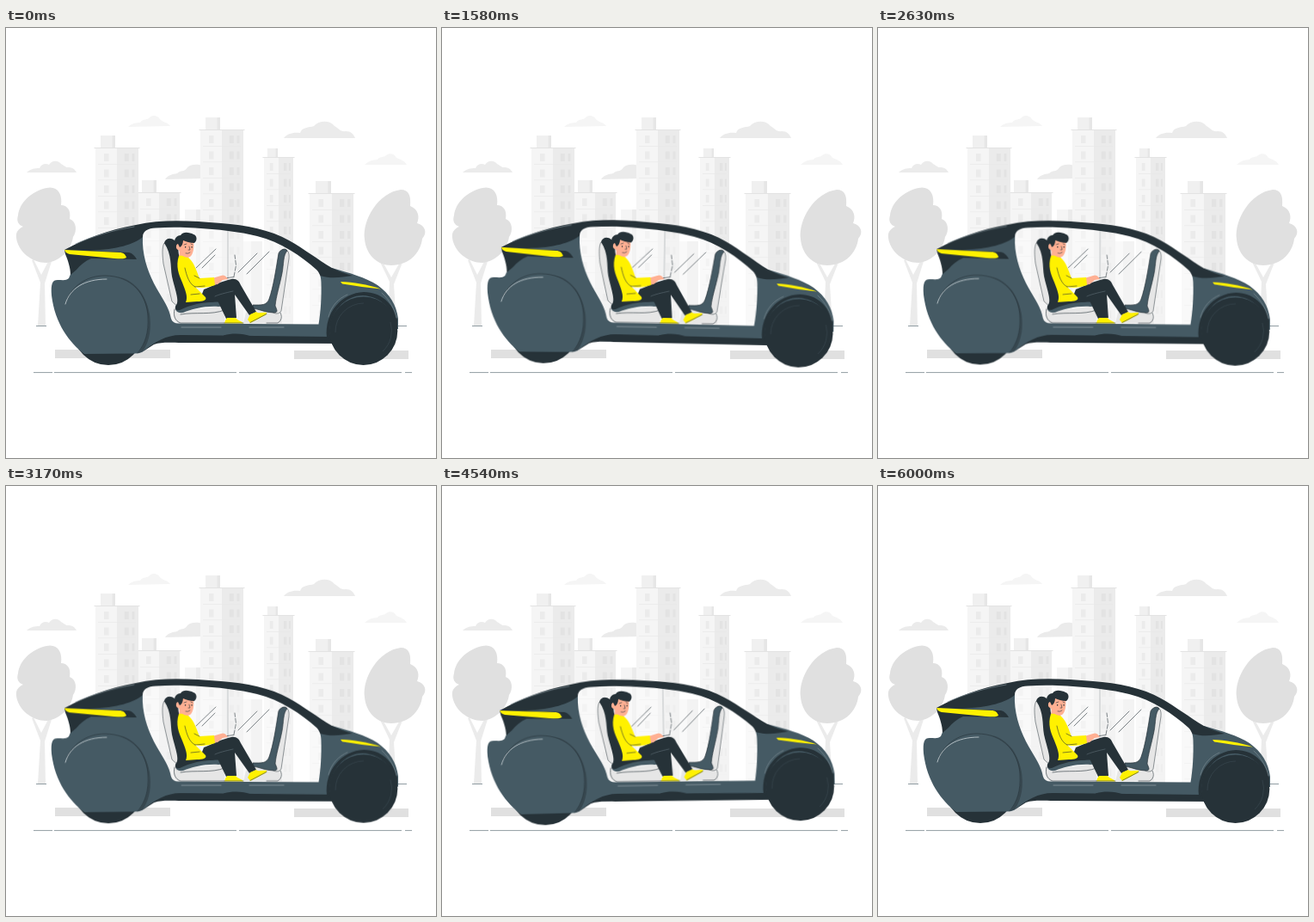
An HTML page that plays this animation: 500 by 500 pixels, repeating every 6.04 s.

```html
<!DOCTYPE html>
<html lang="en">
<head>
<meta charset="utf-8">
<title>Self-driving car</title>
<style>
  html, body { margin: 0; width: 100%; height: 100%; overflow: hidden; background: #fff; }
  svg { display: block; width: 100%; height: 100%; }
  .blue { fill: #455a64; }
  .dark { fill: #263238; }
  .yellow { fill: #fff100; }
  .skin { fill: #ffb093; }
  .pale { fill: #f5f5f5; }
  .soft { fill: #ebebeb; }
  .grey { fill: #e0e0e0; }
  .line { fill: none; stroke: #263238; stroke-width: .6; stroke-linecap: round; stroke-linejoin: round; }
  .shine { fill: none; stroke: #dfe5e8; stroke-width: .7; stroke-linecap: round; }
  .car { transform-origin: 254px 309px; animation: sway 6040ms linear infinite; }
  /* six seconds of sway, then a 40 ms rest */
  @keyframes sway {
    0%, 99.338%, 100% { transform: rotate(0deg); }
    24.834% { transform: rotate(1deg); }
    74.503% { transform: rotate(-1deg); }
  }
</style>
</head>
<body>
<svg viewBox="0 0 500 500">
  <defs>
    <path id="glass" d="M159 243C159 236 165 233 174 232.500C190 231.500 206 231.800 220 232.500C246 234 272 237 292 242C320 249 343 265 361 281C365 285 366.500 290 366.500 296C367 313 366 330 363.500 344.500L200 343.500C193 343 192 339 191 334C188 322 180 312 172 297C164 281 158 262 159 243Z"/>
    <mask id="shell" maskUnits="userSpaceOnUse" x="40" y="210" width="430" height="200">
      <path fill="#fff" d="M40 210H470V410H40Z"/>
      <use href="#glass" fill="#000"/>
    </mask>
    <clipPath id="cabin"><use href="#glass"/></clipPath>
  </defs>

  <g id="clouds">
    <path class="soft" d="M24 168C28 164 33 163 39 163C41 158 46 157 50 159C53 154 60 153 64 158C68 160 69 162 72 162C77 162 80 164 82 168Z"/>
    <path class="pale" d="M142 115C146 111 151 110 156 110C158 106 163 107 166 105C169 101 176 101 179 106C182 110 188 109 191 114Z"/>
    <path class="soft" d="M323 128C327 123 333 121 342 122C344 115 352 116 358 114C364 107 377 107 382 114C387 117 389 121 395 120C401 120 404 123 406 128Z"/>
    <path class="pale" d="M417 159C421 155 426 153 432 153C434 149 439 151 442 148C446 145 452 146 454 151C459 153 463 154 466 159Z"/>
    <path class="soft" d="M185 176C188 171 194 170 199 169C203 165 208 168 211 162C215 158 223 158 228 160V175Z"/>
  </g>

  <g id="city"></g>

  <g id="trees">
    <path class="soft" d="M37 346L40 296L30 270L32 269L41 287L53 264L55 265L45 297L46 346Z"/>
    <path class="grey" d="M14 218C16 202 30 190 47 186C59 183 66 192 64 206C71 206 76 212 74 222C82 225 83 236 78 243C76 257 64 271 47 273C30 273 14 260 12 244C11 237 15 233 20 231C14 229 12 224 14 218Z"/>
    <path class="soft" d="M444 346L446 295L434 270L437 270L448 290L460 269L462 270L451 298L454 346Z"/>
    <path class="grey" d="M417 246C414 222 434 191 459 188C469 188 471 196 470 207C480 211 481 220 478 227C488 230 490 238 484 245C482 262 468 276 448 276C432 276 419 264 417 246Z"/>
  </g>

  <g fill="none" stroke="#455a64" stroke-width=".6">
    <path d="M35 346.500H47M454 346.500H466"/>
    <path d="M32 400.600H54M56 400.600H268M271 400.600H460M464 400.600H472"/>
  </g>
  <path class="grey" d="M57 374H191V384H57ZM335 375H468V385H335Z"/>

  <g class="car">
    <use href="#glass" fill="#fff" fill-opacity=".4"/>

    <g id="cabin-lines" clip-path="url(#cabin)">
      <path class="line" d="M258 235V320" style="stroke:#9aa2a6"/>
      <path class="line" d="M221 279L244 257M228 279L243 264M270 284L292 262M280 286L306 260"/>
    </g>

    <g id="rear-seat">
      <path fill="#e6e6e6" stroke="#263238" stroke-width=".5" d="M184 250C181 255 182 265 183 274L193 318L202 326L211 315L201 264Z"/>
      <path fill="#e6e6e6" d="M195 326L205 329L254 323V343.500H202C196 342 194 336 195 326Z"/>
      <path class="line" d="M196 327C194 335 197 341 203 343H254M203 333C220 330 239 334 254 328"/>
      <path class="blue" d="M198 322C208 318 226 314 256 316C257 321 254 324 247 324C231 323 216 327 206 331C199 332 195 328 198 322Z"/>
      <path class="dark" d="M184 250C185 245 191 243 196 247C201 252 200 259 201 264C203 283 206 300 214 316L256 316V319C236 317 216 321 202 328C196 329 196 325 198 322C202 317 196 303 193 289C191 277 193 263 184 250Z"/>
    </g>

    <g id="front-seat">
      <path fill="#e6e6e6" d="M279 331L302 324L318 332L321 343.500H276Z"/>
      <path class="line" d="M303 343H316C321 340 321 335 319 331"/>
      <path fill="#e6e6e6" stroke="#263238" stroke-width=".5" d="M321 258C326 255 330 260 329 268L320 329C318 333 312 333 308 329L317 285Z"/>
      <path class="blue" stroke="#263238" stroke-width=".7" d="M317 262C319 257 325 256 327 259C322 264 323 275 321 285C318 300 314 312 313 323C315 328 317 331 311 331C302 331 295 327 287 326L287 322C297 322 303 323 306 315C311 301 314 280 317 262Z"/>
    </g>

    <g id="laptop">
      <path class="line" d="M254 291L265 289.500"/>
      <path class="line" stroke-dasharray="5 2" d="M265 289L267.500 276L266 264"/>
    </g>

    <g id="passenger">
      <path class="dark" d="M230 304C240 300 252 294 262 292C268 291 271 294 273 299L291 330L283 334L266 310L268 337L256 338L246 317C239 320 231 319 225 317Z"/>
      <path class="line" d="M264 306C255 308 247 310 243 312" style="stroke:#607078"/>
      <path class="yellow" d="M255 340L257 337H267C269 340 275 341 276 343.500H254ZM281 339L284 333L291 330C294 333 299 330 303 331C304 334 298 335 294 338L284 343Z"/>
      <path class="line" d="M254 343H276M284 342.500L303 332.500"/>
      <path class="skin" d="M202 259L211 260L213 270C207 273 203 270 201 267ZM240 291L250 288C254 286 257 290 258 292L252 293L246 298L240 299Z"/>
      <path class="yellow" d="M201 265C207 264 212 266 215 270C220 276 222 284 225 291L242 290L243 299C234 302 226 303 220 301L232 313C234 317 228 318 222 318L209 319C212 312 208 304 205 296C201 287 197 277 201 265Z"/>
      <path class="line" d="M208 279C210 288 213 298 220 301M220 301L231 300M225 291L219 288M215 310L225 309"/>
      <g transform="translate(-1 1)">
        <path class="skin" d="M201 249C200 245 205 243 211 244L219 246C220 254 219 262 215 265C209 268 203 262 202 257C198 257 197 250 201 249Z"/>
        <path class="dark" d="M198 251C195 244 200 240 204 240C207 235 215 237 219 239C223 240 224 246 220 249C215 249 210 247 207 246C207 250 205 253 203 254L201 250C199 250 198 254 200 257C197 256 196 253 198 251Z"/>
        <path class="line" d="M208 251L211 250M216 250L218 251M214 253L215 257L213 257M210 261Q213 262 215 260"/>
        <path class="dark" d="M209 253h1.200v1.500h-1.200ZM216.500 253h1.200v1.500h-1.200Z"/>
      </g>
    </g>

    <circle class="dark" cx="119" cy="351" r="41"/>
    <path class="dark" d="M158 377C172 360 190 355 206 355.500L366 357L395 352V367L205 366C190 366 181 365 172 368Z"/>

    <g mask="url(#shell)">
      <path class="blue" d="M73 291L79 277L70 260C94 250 120 246 152 240H290L368 284L379 279C400 285 418 290 432 299C446 309 454 322 456 338V350H449C449 330 435 315 415 315C395 315 379 331 377 359L206 357C188 356 174 364 158 377Q154 379 146 378.500L91 379C74 366 57 344 53 311C52 297 54 293 60 293C66 293 70 294 73 291Z"/>
      <path class="dark" d="M68 258C92 245 117 235 151 229C181 222 214 224 250 227C279 229 308 235 329 247C347 257 362 269 379 279C387 283 395 286 403 288C390 290 378 292 365 288L330 262L280 243H175L159 243C148 252 130 257 98 259Z"/>
      <path class="dark" d="M68 258L143 261C147 262 150 265 152 269L99 268C92 271 86 276 82 281L75 287C75 279 72 270 69 263Z"/>
    </g>

    <path class="shine" d="M204 348H250M283 348H323" style="stroke:#96a3a9"/>
    <path class="dark" d="M253 357.500C266 354 276 356 285 358.500H253Z"/>

    <path class="yellow" d="M68 258L132 261C136 261 139 263 140 267C137 269 132 268 126 268L74 263C70 262 69 260 68 258Z"/>
    <path class="shine" d="M81 251C101 242 125 235 149 231" style="stroke:#78878e"/>

    <path fill="#37474f" d="M128 289C150 294 162 311 165 333C167 350 163 365 154 378L159 376C168 363 169 347 167 333C163 309 149 292 128 289Z"/>
    <path class="line" d="M71 315C80 297 96 288 115 288C146 288 164 310 165 336C166 354 162 367 153 378"/>
    <path class="shine" d="M69 321C74 303 91 292 117 292"/>

    <path class="dark" d="M373 360C370 330 391 308 416 307C437 307 450 321 455 339V353L449 347L378 362Z"/>
    <path class="blue" d="M376 357C376 330 394 311 415 311C434 312 447 324 451 340L442 329L402 320L381 340Z"/>
    <path class="shine" d="M375 336C378 323 387 314 397 310M437 308C447 317 452 328 454 337" style="stroke:#78878e"/>
    <circle class="dark" cx="415.600" cy="352.300" r="39.700"/>
    <path fill="none" stroke="#3b4a52" stroke-width=".6" d="M383 354A33 33 0 0 1 416 320M447 342A33 33 0 0 1 438 376"/>
    <path class="yellow" d="M389 295C404 295.500 420 298 436 303.500C421 302 407 300 391 297.500Z"/>
  </g>
</svg>
<script>
  // x, roof y, width, start of the shaded side, rooftop box x, box y, box width
  const towers = [
    [208, 211, 26, 13, 0, 0, 0],
    [153, 191, 49, 25, 158, 177, 17],
    [104, 139, 50, 25, 110, 125, 17],
    [272, 248, 26, 13, 0, 0, 0],
    [226, 118, 50, 25, 232, 104, 17],
    [300, 150, 34, 17, 304, 140, 12],
    [353, 192, 51, 26, 360, 178, 18]
  ];
  const box = (x, y, w, h, fill) => `<rect x="${x}" y="${y}" width="${w}" height="${h}" fill="${fill}"/>`;
  const tower = ([x, y, w, side, bx, by, bw]) => {
    let out = box(x, y, side, 346 - y, '#f5f5f5') + box(x + side, y, w - side, 346 - y, '#ebebeb');
    if (!bw) return out;
    out += box(bx, by, bw, y - by, '#f0f0f0') + box(bx + bw * .8, by, bw * .2, y - by, '#e6e6e6');
    out += box(x - 1.5, y, w + 3, 1, '#e3e3e3');
    for (let fy = y + 7; fy < 335; fy += 18.5) {
      out += box(x + side * .4, fy, side * .22, 9, '#ebebeb');
      out += box(x + side * 1.35, fy, side * .2, 9, '#e3e3e3') + box(x + side * 1.7, fy, side * .12, 9, '#e3e3e3');
      out += box(x + 3, fy + 12, w - 6, .7, '#e9e9e9');
    }
    return out;
  };
  document.getElementById('city').innerHTML = towers.map(tower).join('');
</script>
</body>
</html>
```
